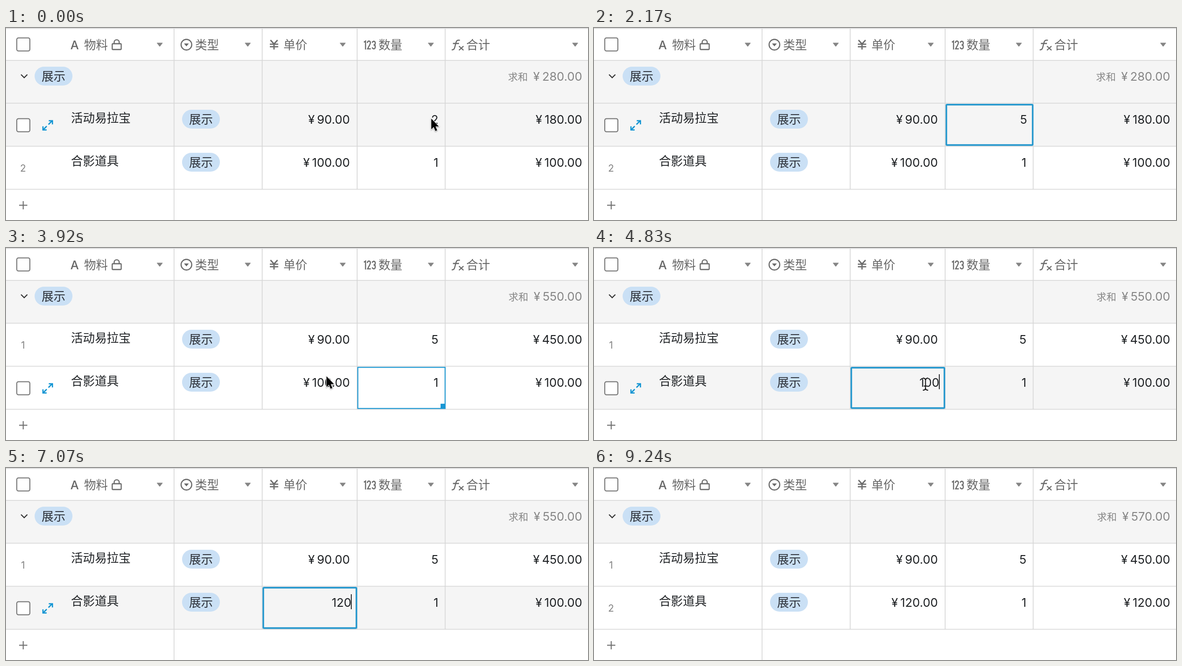
An HTML page for the animation above (9.31 s loop, 1200x397 px).

```html
<!DOCTYPE html>
<html lang="zh-CN">
<head>
<meta charset="utf-8">
<style>
  html, body { margin: 0; width: 100%; height: 100%; overflow: hidden; background: #fff; }
  svg { display: block; width: 1200px; height: 397px; }
  text { font-family: Inter, "Noto Sans CJK SC", "Noto Sans CJK", sans-serif; font-size: 24.6px; fill: #1f2225; }
  .cjk { font-family: "Noto Sans CJK SC", "Noto Sans CJK", sans-serif; }
  .head { fill: #666; }
  .end { text-anchor: end; word-spacing: -2px; }
  .mid { text-anchor: middle; }
  .num { font-size: 20px; fill: #808080; text-anchor: middle; }
  .sum, .sum tspan { fill: #868686; }
  .sum .cjk { font-size: 20.5px; }
  .line { fill: none; stroke: #6b6b6b; stroke-width: 2.3; }
  .grid { fill: none; stroke: #d6d6d6; stroke-width: 1.6; }
  .tri { fill: #858585; }
  .tag { fill: #cae0f5; }
  .tagText { fill: #2b2f36; }
  .box { fill: #fff; stroke: #747474; stroke-width: 2; }
  .expand { fill: none; stroke: #1295d3; stroke-width: 2.5; }
  .gray { fill: #f5f5f5; }
  .caret { fill: #1f2225; }
</style>
</head>
<body>
<svg viewBox="0 0 1200 397">
  <defs>
    <rect id="check" x="22.2" y="-14" width="27" height="27" rx="3.5" class="box"/>
    <path id="tri" class="tri" d="M-5.4 -3.8H5.4Q6.3 -3.8 5.7 -2.9L.7 3.6Q0 4.5 -.7 3.6L-5.7 -2.9Q-6.3 -3.8 -5.4 -3.8Z"/>
    <path id="expand" class="expand" d="M87.5 -2 95.5 -10M88.2 -9.8H95.8V-2.2M84 1.5 76 9.5M76.2 1.7V9.3H83.8"/>
    <path id="ibeam" d="M-5.5 -12.5Q0 -12.5 0 -8 0 -12.5 5.5 -12.5M0 -9V9M-5.5 12.5Q0 12.5 0 8 0 12.5 5.5 12.5M-3.5 4H3.5"/>
    <g id="tag">
      <rect class="tag" width="78" height="39" rx="19.5"/>
      <text class="cjk mid tagText" x="39" y="29">展示</text>
    </g>
  </defs>

  <rect class="gray" y="67" width="1200" height="88"/>
  <rect class="gray" id="hover1" y="156" width="1200" height="88"/>
  <rect class="gray" id="hover2" y="245" width="1200" height="88"/>
  <path class="grid" d="M0 1H1200M0 67H1200M0 155.5H1200M0 244.5H1200M0 333.5H1200
    M346.5 1V397M528.3 1V333M724 1V333M905.5 1V333"/>

  <use href="#check" y="34.5"/>
  <text class="head" x="132.7" y="44" font-weight="500">A</text>
  <text class="cjk head" x="161" y="43.5">物料</text>
  <text class="cjk head" x="390" y="43.5">类型</text>
  <text class="cjk head" x="572" y="43.5">单价</text>
  <text class="cjk head" x="768" y="43.5">数量</text>
  <text class="cjk head" x="949" y="43.5">合计</text>
  <g class="line">
    <rect x="219" y="32.5" width="18.5" height="12" rx="1.5"/>
    <path d="M223 32V29.5a5.2 5.2 0 0 1 10.4 0V32"/>
    <circle cx="372" cy="34.5" r="11"/>
    <path stroke-width="2.6" d="M545.3 25 552.6 33 559.9 25M544 33.5H561.3M544 38.7H561.3M552.6 33V44.5"/>
    <path d="M738 29.5 741.3 27V44.5"/>
    <path d="M745.3 31V30a3 3 0 0 1 6 0Q751.3 33 749 36.5L745.6 43.2H752.3"/>
    <path d="M755.3 30.5a3 3 0 0 1 6 0V32Q761.3 35 757.8 35 761.3 35 761.3 38V40a3 3 0 0 1 -6 0"/>
    <path d="M919 45Q924 46 925.5 39L928 29.5Q929.5 24 936 25.5M921.5 32H934M934 37.5 943.3 46M943.3 37.5 934 46"/>
  </g>
  <path d="M367 32H377L372 38Z" fill="#6b6b6b"/>
  <use href="#tri" x="317" y="34.3"/><use href="#tri" x="498.5" y="34.3"/>
  <use href="#tri" x="694.3" y="34.3"/><use href="#tri" x="876" y="34.3"/>
  <use href="#tri" x="1173.5" y="34.3"/>

  <path d="M31 96.3 37.5 102.8 44 96.3" fill="none" stroke="#333" stroke-width="2.1"/>
  <use href="#tag" x="59" y="80"/>
  <text class="sum end" x="1188" y="109"><tspan class="cjk">求和</tspan><tspan id="sum" dx="11"></tspan></text>

  <text class="cjk" x="134" y="195">活动易拉宝</text>
  <text class="cjk" x="134" y="284">合影道具</text>
  <use href="#tag" x="363" y="169"/>
  <use href="#tag" x="363" y="258"/>
  <text class="num" id="num1" x="35" y="208">1</text>
  <text class="num" id="num2" x="35" y="297">2</text>
  <g id="tools1"><use href="#check" y="201.5"/><use href="#expand" y="201.5"/></g>
  <g id="tools2"><use href="#check" y="290.5"/><use href="#expand" y="290.5"/></g>

  <text class="end" x="709" y="198">¥ 90.00</text>
  <text class="end" id="price" y="287"></text>
  <text class="end" id="qty" y="198"></text>
  <text class="end" x="891.5" y="287">1</text>
  <text class="end" id="total1" x="1188" y="198"></text>
  <text class="end" id="total2" x="1188" y="287"></text>

  <g id="select" fill="none" stroke="#1896d3" stroke-width="2">
    <rect id="frame" height="85"/>
    <rect id="handle" width="10" height="10" fill="#1896d3" stroke="none"/>
  </g>
  <g id="edit" fill="none">
    <rect id="glow" height="83.5" rx="1.5" stroke="#a9d0e4" stroke-width="4"/>
    <rect id="ring" height="83.5" rx="1.5" stroke="#2196cd" stroke-width="2.8"/>
  </g>
  <rect id="caret" class="caret" width="1.8" height="31"/>

  <path id="arrow" d="M.8 1.2V23.5L5.8 18.8 9.3 27 13 25.4 9.6 17.4H16.4Z"
    fill="#000" stroke="#fff" stroke-width="1.8" paint-order="stroke" style="filter:drop-shadow(0 1px 1px #0006)"/>
  <g id="beam" fill="none">
    <use href="#ibeam" stroke="#fff" stroke-width="4.4"/>
    <use href="#ibeam" stroke="#111" stroke-width="2"/>
  </g>

  <path d="M27 366.5H44M35.5 358V375" class="line" style="stroke-width:2"/>
</svg>

<script>
const LOOP = 9310, TICK = 70;
const $ = id => document.getElementById(id);
const show = (id, on) => { $(id).style.display = on ? '' : 'none'; };
const place = (id, attrs) => { for (const k in attrs) $(id).setAttribute(k, attrs[k]); };
const between = (t, a, b) => t >= a && t < b;

// Last value whose start time has passed.
const pick = (steps, t) => steps.filter(s => s[0] <= t).pop()[1];

const COLS = {
  price: { x: 528, w: 196, text: 709, typed: 712, caret: 711 },
  qty: { x: 724, w: 182, text: 891.5, typed: 893, caret: 892.2 }
};
const ROWS = [156, 245];

const TEXTS = {
  qty: [[0, '2'], [1190, ''], [1610, '5']],
  price: [[0, '¥ 100.00'], [4550, '100'], [6090, '10'], [6230, '1'], [6650, '12'], [6930, '120'], [7350, '¥ 120.00']],
  sum: [[0, '¥ 280.00'], [3010, '¥ 550.00'], [8120, '¥ 570.00']],
  total1: [[0, '¥ 180.00'], [3010, '¥ 450.00']],
  total2: [[0, '¥ 100.00'], [8120, '¥ 120.00']]
};

// Focused cell: [column, row, editing]
const focusSteps = [
  [0, null], [70, ['qty', 0, false]], [560, ['qty', 0, true]], [2660, ['qty', 1, false]],
  [4340, ['price', 1, false]], [4550, ['price', 1, true]], [7350, ['price', 1, false]], [7630, null]
];
const caretSteps = [[0, true], [910, false], [1190, true], [2170, false], [4550, true], [5600, false], [6090, true]];

// Pointer stops: [time, x, y]
const stops = [
  [0, 876, 186], [3500, 876, 186], [3920, 660, 264], [4200, 683, 281], [4830, 683.5, 281.5],
  [5040, 692, 299], [5320, 712, 282], [LOOP, 712, 282]
];
function pointer(t) {
  const i = stops.findIndex(p => p[0] > t), a = stops[i - 1], b = stops[i];
  const k = (t - a[0]) / (b[0] - a[0]), e = k * k * (3 - 2 * k);
  return [a[1] + (b[1] - a[1]) * e, a[2] + (b[2] - a[2]) * e];
}

function render(t) {
  const [px, py] = pointer(t);
  const row = t >= 9030 ? 0 : py > 245 ? 2 : 1;
  for (const n of [1, 2]) {
    show('tools' + n, row === n);
    show('num' + n, row !== n);
  }
  show('hover1', row === 1);
  show('hover2', row === 2 && t >= 3990);

  for (const id in TEXTS) $(id).textContent = pick(TEXTS[id], t);

  const focus = pick(focusSteps, t), editing = !!focus && focus[2];
  for (const id in COLS) {
    place(id, { x: editing && focus[0] === id ? COLS[id].typed : COLS[id].text });
  }
  show('select', focus && !editing);
  show('edit', editing);
  show('caret', editing && pick(caretSteps, t));
  if (focus) {
    const c = COLS[focus[0]], y = ROWS[focus[1]];
    place('frame', { x: c.x + 1.4, y: y + 1.8, width: c.w - 2 });
    place('handle', { x: c.x + c.w - 10, y: y + 77 });
    for (const id of ['glow', 'ring']) place(id, { x: c.x + 2.5, y: y + 2.5, width: c.w - 4 });
    place('caret', { x: c.caret, y: y + 16 });
  }

  show('beam', between(t, 560, 1190) || between(t, 4550, 6090));
  show('arrow', t < 560 || between(t, 3570, 4550));
  for (const id of ['beam', 'arrow']) place(id, { transform: `translate(${px} ${py})` });
}

const start = performance.now();
function loop() {
  const t = (performance.now() - start) % LOOP;
  render(Math.floor(t / TICK) * TICK);
  requestAnimationFrame(loop);
}
loop();
</script>
</body>
</html>
```
